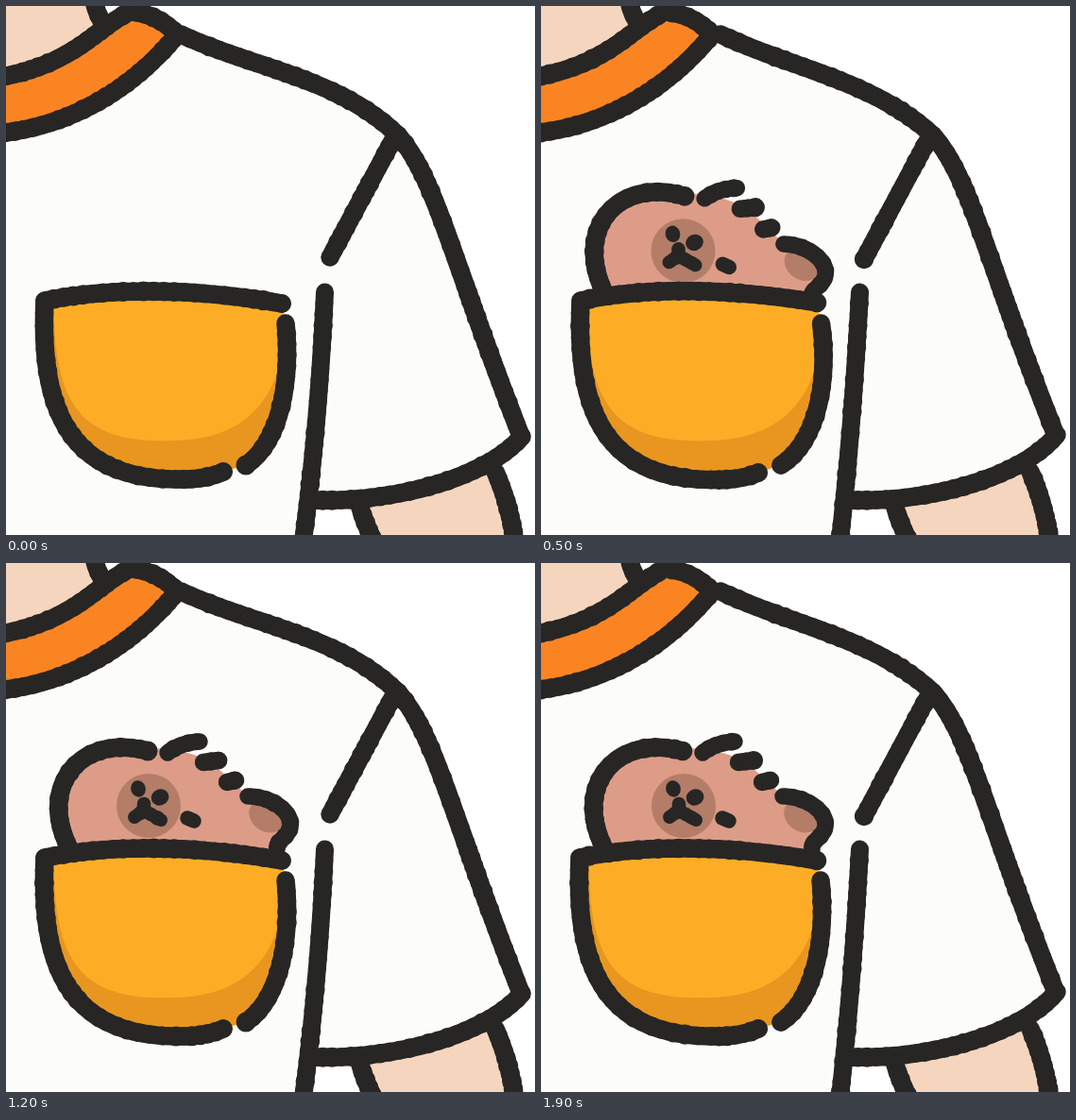
An HTML page with a canvas that plays this animation: 560x560 px, repeating every 2000 ms.

```html
<!DOCTYPE html>
<html lang="en">
<head>
<meta charset="utf-8">
<title>Pocket friend</title>
<style>
  html, body { margin: 0; width: 100%; height: 100%; overflow: hidden; background: #fff; }
  canvas { display: block; width: 100vw; height: 100vh; }
</style>
</head>
<body>
<canvas id="stage" width="560" height="560"></canvas>
<script>
const ctx = document.getElementById('stage').getContext('2d');
const LOOP = 2000, STEP = 100;
const INK = '#272625', CLOTH = '#fcfdfb', SKIN = '#f5d5bd', ORANGE = '#fb8422';
const YELLOW = '#fdad25', AMBER = '#e8961f', FUR = '#dd9c87', BROWN = '#b37d68';

// Samples a Bezier curve of any degree; control points come as x, y pairs.
function bez(...nums) {
  const ctrl = [], out = [], n = 48;
  for (let i = 0; i < nums.length; i += 2) ctrl.push([nums[i], nums[i + 1]]);
  for (let i = 0; i <= n; i++) {
    const t = i / n;
    let p = ctrl;
    while (p.length > 1) {
      p = p.slice(1).map(([x, y], j) => [p[j][0] + (x - p[j][0]) * t, p[j][1] + (y - p[j][1]) * t]);
    }
    out.push(p[0]);
  }
  return out;
}

let seed = 1;
function rand() {
  seed = (seed * 16807) % 2147483647;
  return seed / 2147483647;
}

function trace(points) {
  ctx.beginPath();
  points.forEach(([x, y]) => ctx.lineTo(x, y));
}

function fill(color, ...parts) {
  trace(parts.flat());
  ctx.fillStyle = color;
  ctx.fill();
}

function oval(color, x, y, rx, ry, turn = 0) {
  ctx.beginPath();
  ctx.ellipse(x, y, rx, ry, turn, 0, 7);
  ctx.fillStyle = color;
  ctx.fill();
}

// Marker line: a core stroke with overlapping uneven dabs.
function ink(points, width = 20) {
  trace(points);
  ctx.strokeStyle = ctx.fillStyle = INK;
  ctx.lineCap = ctx.lineJoin = 'round';
  ctx.lineWidth = width - 0.5;
  ctx.stroke();
  let gap = 0, last = points[0];
  ctx.beginPath();
  for (const [x, y] of points) {
    gap += Math.hypot(x - last[0], y - last[1]);
    last = [x, y];
    if (gap < 8) continue;
    gap = 0;
    const r = width / 2 + rand() * 0.9 - 0.3;
    ctx.moveTo(x + r, y);
    ctx.arc(x, y, r, 0, 7);
  }
  ctx.fill();
}

// k is 0 or 1: the two alternating drawings that make the line boil.
function drawShirt(k) {
  const neck = bez(93, -6, 96, 8, 102, 17);
  const armLeft = bez(375, 531, 380, 548, 391, 570);
  const armRight = bez(518, 493, 534, 530, 539, 570);
  const inner = bez(-10, 76, 72, 62, 92, 26, 131, 6);
  const top = bez(131, 6, 160, 8, 180, 29);
  const outer = bez(-10, 135, 70, 128, 135, 85, 177, 35);
  const shoulder = bez(185 + 5 * k, 30, 265, 67 - k, 352, 76 + 3 * k, 415, 137);
  const sleeve = bez(415, 137, 455, 183, 469 - k, 260, 545 - k, 455 - 3 * k);
  const hem = bez(546, 456 - 2 * k, 503, 504, 400, 526, 326, 523);

  fill(SKIN, [[-5, -5]], neck, [[90, 40], [-5, 80]]);
  fill(SKIN, armLeft, [...armRight].reverse());
  [neck, armLeft, armRight].forEach(p => ink(p));
  fill(CLOTH, outer, shoulder, sleeve, hem, [[314, 570], [-10, 570]]);
  fill(ORANGE, inner, top, [...outer].reverse());
  [inner, top, outer, shoulder, sleeve, hem].forEach(p => ink(p));
  ink(bez(410, 141, 343 - k, 266 + 2 * k), 19.5);
  ink(bez(337.5, 303, 331 - k, 445, 314 + 2 * k, 570), 19.5);
}

function drawFace(x, y) {
  ctx.save();
  ctx.translate(x, y);
  oval(BROWN, 0, 0, 34, 34);
  oval(INK, -11, -18, 7.8, 8.8, -0.3);
  oval(INK, 12, -9, 9.5, 8.5, -0.4);
  ink(bez(-5, -2, -5, 6), 15);
  ink(bez(-15, 12, -5, 5), 14.5);
  ink(bez(-5, 5, 13, 15), 14.5);
  ctx.restore();
}

// The friend leans over by tilt and swings upright out of the pocket.
function drawFriend(tilt) {
  const px = 60, py = 300;
  const cos = Math.cos(tilt), sin = Math.sin(tilt);
  const dx = px - 15 * tilt, dy = py + 40 * tilt * tilt;
  const back = bez(68, 304, 32, 236, 80, 180, 150, 199);
  const edge = bez(149, 196, 238, 196, 225, 240, 294, 268);

  ctx.save();
  ctx.beginPath();
  ctx.rect(0, 0, 560, 309);
  ctx.clip();

  ctx.save();
  ctx.translate(dx, dy);
  ctx.rotate(tilt);
  ctx.translate(-px, -py);
  fill(FUR, back, edge, [[287, 310], [280, 400], [70, 400]]);
  oval(BROWN, 276, 268, 20, 16, 0.6);
  ink(back);
  ink(bez(171, 201, 185, 190, 205, 189), 18);
  ink(bez(209, 211, 225, 209), 19);
  ink(bez(234, 232, 243, 230), 19);
  ink(bez(256, 247, 300, 247, 324, 290, 283, 288, 287, 303), 18);
  ink(bez(192, 270, 199, 273), 16);
  ctx.restore();

  // The face stays level while the body leans.
  drawFace(dx + 91 * cos + 43 * sin - 47 * tilt, dy + 91 * sin - 43 * cos);
  ctx.restore();
}

function drawPocket(bulge) {
  const b = 4 * bulge;
  const top = bez(41 + b / 2, 312, 120, 296 - b / 4, 215, 301, 292, 315 - b / 2);
  const left = [
    ...bez(41 + b / 2, 312, 36 + b / 2, 420, 62, 500 + b / 4, 180, 501 + b / 4),
    ...bez(180, 501 + b / 4, 210, 502 + b / 4, 230, 493 + b / 2)
  ];
  const right = bez(296 + b / 4, 336, 302 + 1.5 * b, 395, 291 + b, 461, 254, 486);
  const glow = [
    ...bez(50 - b, 310, 52 - b, 410, 68, 464, 175, 460),
    ...bez(175, 460, 240, 460, 290 + b, 430, 296 + b, 340)
  ];
  ctx.save();
  fill(AMBER, top, right, [...left].reverse());
  ctx.clip();
  fill(YELLOW, glow, [[310, 290], [40, 290]]);
  ctx.restore();
  [left, top, right].forEach(p => ink(p));
}

function draw(now) {
  const n = Math.floor((now % LOOP) / STEP);
  const tilt = n < 7 ? Math.min(0.6, 0.32 * 0.28 ** (n - 3)) : 0;
  const bulge = n < 7 ? Math.sin(Math.PI * n / 6) : 0;
  seed = 71 + (n % 2) * 9000;
  ctx.fillStyle = '#fff';
  ctx.fillRect(0, 0, 560, 560);
  drawShirt(n % 2);
  if (n > 1) drawFriend(tilt);
  drawPocket(bulge);
}

const start = performance.now();
function tick() {
  draw(performance.now() - start);
  requestAnimationFrame(tick);
}
tick();
</script>
</body>
</html>
```
